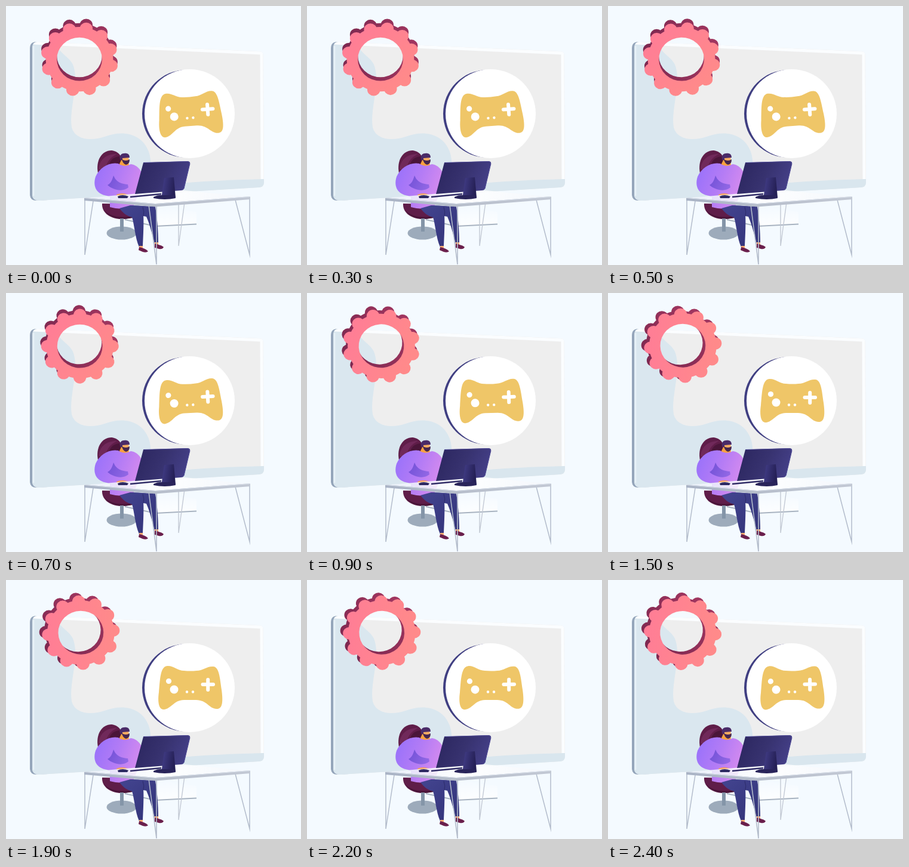
An HTML page with a canvas that plays this animation: 494x434 px, repeating every 2.5 s.

```html
<!DOCTYPE html>
<html lang="en">
<head>
<meta charset="utf-8">
<title>Game developer at work</title>
<style>
html, body { margin: 0; width: 494px; height: 434px; overflow: hidden; background: #f4faff; }
canvas { display: block; }
</style>
</head>
<body>
<canvas id="stage" width="494" height="434"></canvas>
<script>
const ctx = document.getElementById('stage').getContext('2d');
const LOOP = 2500, STEP = 100, RAD = Math.PI / 180, TAU = Math.PI * 2;

function shape(d, fill) {
  ctx.fillStyle = fill;
  ctx.fill(new Path2D(d));
}
function line(d, color, width) {
  ctx.strokeStyle = color;
  ctx.lineWidth = width;
  ctx.stroke(new Path2D(d));
}
function oval(x, y, rx, ry, fill) {
  ctx.beginPath();
  ctx.ellipse(x, y, rx, ry, 0, 0, TAU);
  ctx.fillStyle = fill;
  ctx.fill();
}
function grad(x0, y0, x1, y1, ...colors) {
  const g = ctx.createLinearGradient(x0, y0, x1, y1);
  colors.forEach((c, i) => g.addColorStop(i / (colors.length - 1), c));
  return g;
}
function turned(x, y, degrees, draw, sx = 1, sy = 1) {
  ctx.save();
  ctx.translate(x, y);
  ctx.scale(sx, sy);
  ctx.rotate(degrees * RAD);
  draw();
  ctx.restore();
}
const ease = u => {
  u = Math.min(1, Math.max(0, u));
  return u * u * (3 - 2 * u);
};
// Swing out, rest, then start back before the loop cuts.
const swing = t => ease((t - 400) / 900) - ease((t - 1850) / 2300);

function board() {
  shape('M51 60 Q40 60 40 71 L40 317 Q41 327 53 326 L70 325 L58 61Z', '#94a5ba');
  const face = 'M53 60 L425 76 Q431 77 431 83 L432 296 Q432 303 424 304 L56 326 Q44 326 44 316 L44 71 Q44 60 53 60Z';
  shape(face, '#eeeeee');
  ctx.save();
  ctx.clip(new Path2D(face));
  shape('M40 55 L82 55 C84 78 104 82 112 98 C124 128 105 172 110 203' +
    ' C115 224 142 227 165 219 C196 207 228 214 239 244 C246 264 240 284 236 330 L40 330Z', '#dae7ef');
  shape('M236 302 Q330 292 434 290 L434 310 L236 322Z', '#d9e6ee');
  line('M46 62 L428 79 L429 290', '#fbfdff', 5);
  line('M46 67 L46 318', '#e6f0f6', 3);
  ctx.restore();
}

function badge() {
  oval(302, 180.5, 74, 73.5, '#403f82');
  oval(307.5, 180.5, 75.5, 74.5, '#ffffff');
}

function pad(p) {
  turned(309, 182, -4.2 * (1 - p), () => {
    ctx.translate(-309, -182);
    shape('M270 144 C280 143 287 152 298 152 Q309 153 319 152 C330 152 337 144 347 145' +
      ' C357 146 358 163 361 184 C364 206 362 216 353 216' +
      ' C340 216 337 201 318 201 L298 201 C281 201 277 216 264 217' +
      ' C255 217 254 202 256 188 C258 168 258 145 270 144Z', '#efc668');
    oval(272.5, 169.5, 4.6, 4.6, '#fff');
    oval(281.5, 183.5, 7, 7, '#fff');
    oval(303, 187.5, 2.2, 2.2, '#fff');
    oval(313, 187.5, 2.2, 2.2, '#fff');
    ctx.lineCap = 'round';
    line('M329.5 175 H347 M338.2 167 V184', '#fff', 6);
    ctx.lineCap = 'butt';
  });
}

function cog(y, fill) {
  const teeth = 12;
  ctx.fillStyle = fill;
  ctx.beginPath();
  ctx.arc(0, y, 55, 0, TAU);
  ctx.arc(0, y, 37, 0, TAU, true);
  ctx.fill();
  ctx.beginPath();
  for (let i = 0; i < teeth; i++) {
    const a = (12 + i * 360 / teeth - 90) * RAD;
    const x = Math.cos(a) * 53, ty = y + Math.sin(a) * 53;
    ctx.moveTo(x + 10.5, ty);
    ctx.arc(x, ty, 10.5, 0, TAU);
  }
  ctx.fill();
}
function gear(p) {
  turned(123, 86, -46 * p, () => {
    cog(-3.2, grad(-60, 0, 60, 0, '#7d2850', '#a13660'));
    cog(3.2, grad(-45, -40, 35, 45, '#ff7d96', '#ff8a8a'));
  }, 1.025, 0.985);
}

function chair() {
  const leather = '#5f1d49', shade = '#4a1539';
  shape('M154 280 C150 259 160 242 177 242 C191 244 197 255 196 274 L192 304 L165 308Z', leather);
  shape('M155 273 C157 258 166 248 186 248 C173 254 167 264 166 278Z', '#70295a');
  shape('M172 272 C172 259 180 253 190 252 L196 274Z', shade);
  shape('M161 331 C160 345 172 356 192 357 C206 357 214 354 215 350 L212 332Z', leather);
  shape('M164 341 C172 352 190 356 212 352 L212 355 C190 360 170 354 164 341Z', shade);
  oval(193.5, 380.5, 25, 11, '#9dabbb');
  shape('M191 356 H197 V378 H191Z', '#8495a8');
}

function legs() {
  const denim = grad(200, 335, 252, 395, '#42438e', '#33347a');
  shape('M208 334 L250 336 C253 355 255 375 255 398 L249 398 C244 380 241 366 235 353 L208 348Z', denim);
  shape('M190 339 L208 334 L228 335 C232 350 230 380 229 404 L223 404 C216 388 215 366 211 354 C202 352 195 346 190 339Z', denim);
  line('M230 352 Q232 345 229 337', '#2c2c6a', 1);
  shape('M223 402 H229 V407 H223Z M249 396 H255 V401 H249Z', '#f9ad72');
  shape('M223 404 C229 405 234 407 238 411 Q235 414 229 412 L222 409Z', '#6a1f4c');
  shape('M249 398 C255 400 261 401 264 404 Q262 408 256 407 L249 405Z', '#6a1f4c');
}

function worker() {
  const shirt = grad(148, 275, 230, 305, '#9871fb', '#b47cf5', '#d98dee');
  shape('M193 258 L205 258 L206 268 Q199 273 189 267Z', '#f9a13f');
  shape('M188 264 C174 261 157 270 150 286 C145 302 151 315 169 318 L174 320' +
    ' L174 337 Q195 343 213 336 L228 300 C232 282 224 267 209 265 Q198 271 188 264Z', shirt);
  shape('M180 284 C183 291 188 298 204 299 L205 304 C196 312 180 309 170 300 C176 297 178 291 180 284Z',
    grad(172, 290, 205, 306, '#7453d8', '#9469e6'));
  shape('M193 254 L205 252 L206 260 L195 262Z', '#f9ad62');
  shape('M191 257 C189 249 195 246 202 247 Q207 248 207 254 L195 255 L195 259Z', '#4a2b68');
  shape('M194 257 Q201 261 207 257 Q207 265 201 266 Q196 265 194 257Z', '#46264f');
  shape('M185 316 Q194 312 204 316 L205 320 L186 320Z', '#f7a05a');
}

function shelf() {
  shape('M252 336 L319 345 L319 364 L252 369Z', grad(0, 336, 0, 368, '#ffffff00', '#ffffffcc'));
  line('M199 358 L250 369 L319 365.5', '#a8b3c0', 2.2);
}

function desk() {
  const pale = '#c3c9d4', mid = '#b3bccb';
  line('M289 330 L289 402 L299 329', pale, 1.4);
  line('M132 325 L132 417 L146 327', mid, 1.5);
  line('M239 333 L252 433 L252 332', mid, 1.6);
  line('M384 325 L408 417 L408 321', mid, 1.5);
  ctx.globalAlpha = 0.86;
  shape('M131 322 L290 308 L409 320 L250 333Z', grad(131, 320, 409, 320, '#e9eff9', '#ffffff', '#f3f6fb'));
  ctx.globalAlpha = 1;
  shape('M131 321 L250 331 L409 319 L409 324 L250 336.5 L131 326Z',
    grad(131, 320, 409, 320, '#a9b3c5', '#b8bfcc', '#c2c8d4'));
  line('M131 321.5 L250 331.5 L409 319.5', '#dce3ed', 1);
}

function computer() {
  shape('M187 319 Q195 315 205 319 L203 322 L188 322Z', '#2e2a62');
  line('M208 320 L260 315', '#2f2b66', 2.5);
  shape('M230 262.5 L305 260 Q309 261 308 264 L298 306 Q297 309 293 309 L216 315Z',
    grad(220, 270, 300, 308, '#2c2760', '#37326f', '#454089'));
  line('M230 262.5 L305 260.5 L308 264 L298 306', '#4f4a96', 1);
  shape('M265 288 L281 287 L284 321 L260 323Z', grad(262, 300, 283, 303, '#3f3a82', '#241f54'));
  shape('M247 320 Q255 316 262 317 L283 317 L284 322 Q266 326 247 322Z', '#29245a');
}

function draw(t) {
  const p = swing(t);
  ctx.fillStyle = '#f4faff';
  ctx.fillRect(0, 0, 494, 434);
  board();
  gear(p);
  badge();
  pad(p);
  shelf();
  chair();
  worker();
  legs();
  desk();
  computer();
}

const start = performance.now();
function tick() {
  const t = (performance.now() - start) % LOOP;
  draw(Math.floor(t / STEP) * STEP);
  requestAnimationFrame(tick);
}
tick();
</script>
</body>
</html>
```
